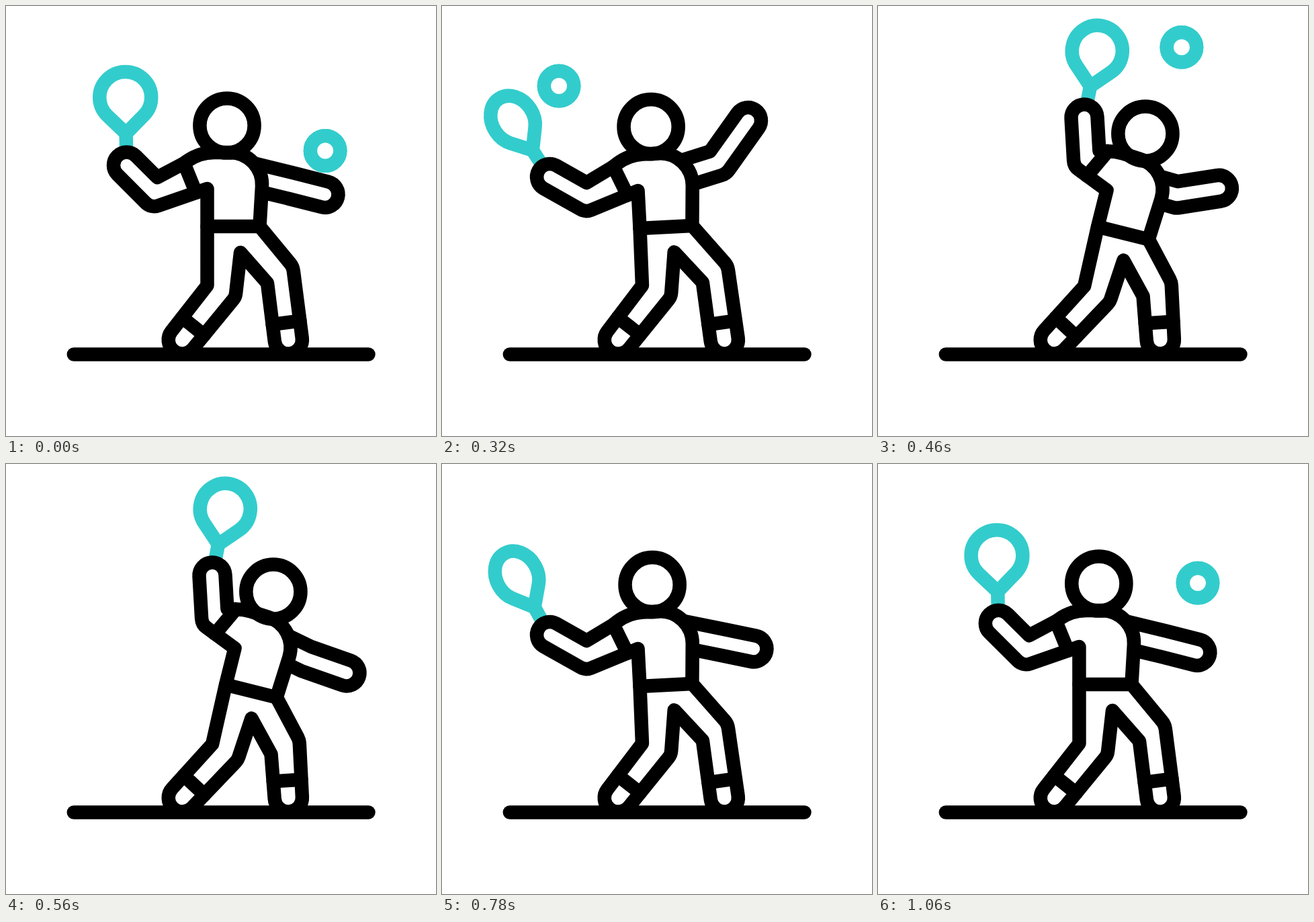
An HTML page with a canvas for the animation above (1080 ms loop, 640 by 640 pixels).

```html
<!DOCTYPE html>
<html lang="en">
<head>
<meta charset="utf-8">
<title>Racket player</title>
<style>
  html, body { margin: 0; width: 100%; height: 100%; overflow: hidden; background: #fff; }
  canvas { display: block; width: 100vw; height: 100vh; }
</style>
</head>
<body>
<canvas id="stage" width="640" height="640"></canvas>
<script>
const ctx = document.getElementById('stage').getContext('2d');
const LOOP = 1080;
const INK = '#000', TEAL = '#33cccc';
const WAIST = [299.5, 328], HIP = [377.5, 328];
const FEET = [[262.3, 497], [420.3, 497]];
const ARM = 19.5, FOOT = 20.6;

// Body poses: waist position, torso and racket angles in degrees,
// raised shoulder offset, racket hand and elbow, sleeve end along the arm.
const ready = {
  x: 299.5, y: 328, lean: 0, nod: 0, liftX: 0, liftY: 0,
  handX: 179.5, handY: 237, elbowX: 220.5, elbowY: 278,
  swing: -1, face: 38.5, cuff: 0.8
};
const windup = {
  x: 294.5, y: 331, lean: -3, nod: -5, liftX: 0, liftY: 0,
  handX: 160.5, handY: 254.5, elbowX: 214.5, elbowY: 285,
  swing: -33, face: 31, cuff: 0.8
};
const strike = {
  x: 327, y: 328.5, lean: 14, nod: 6, liftX: 26, liftY: -13,
  handX: 307, handY: 166, elbowX: 310.5, elbowY: 227,
  swing: 11, face: 37.5, cuff: 0.4
};
const recover = { ...windup, nod: -3, swing: -29 };
const bodyKeys = [
  [0, ready], [320, windup], [450, strike], [560, strike], [780, recover], [LOOP, ready]
];

const reach = (elbowX, elbowY, handX, handY) => ({ elbowX, elbowY, handX, handY });
const rest = reach(424, 267.5, 475, 280.5);
const armKeys = [
  [0, rest],
  [160, reach(410.5, 250, 474, 227)],
  [320, reach(411, 233, 455.5, 170.5)],
  [400, reach(442, 270, 507.5, 231.5)],
  [560, reach(447, 290, 507, 311)],
  [780, reach(418, 265.5, 464, 275)],
  [LOOP, rest]
];

// Smooth curve through the keys, resting at turning points.
function pose(keys, t) {
  let i = 0;
  while (t >= keys[i + 1][0]) i++;
  const [t0, a] = keys[i], [t1, b] = keys[i + 1];
  const d = t1 - t0, u = (t - t0) / d, result = {};
  const rate = (j, name) =>
    (keys[j + 1][1][name] - keys[j][1][name]) / (keys[j + 1][0] - keys[j][0]);
  const slope = (j, name) => {
    if (j === 0 || j === keys.length - 1) return 0;
    const l = rate(j - 1, name), r = rate(j, name);
    return l * r > 0 ? 2 * l * r / (l + r) : 0;
  };
  for (const name in a) {
    result[name] = a[name] + (b[name] - a[name]) * u * u * (3 - 2 * u) +
      d * u * (1 - u) * (slope(i, name) * (1 - u) - slope(i + 1, name) * u);
  }
  return result;
}

function ballAt(t) {
  if (t < 320) {
    const u = t / 160;
    return [476 - 135 * u - 8 * u * u, 217 - 251 * u + 101 * u * u];
  }
  if (t < 560) {
    const p = Math.pow((t - 320) / 200, 1.68);
    return [174 + 500 * p, 119 - 137 * p + 60 * p * p];
  }
  return [476, 217 - 2.1 * (LOOP - t)];
}

const add = (p, q, k = 1) => [p[0] + q[0] * k, p[1] + q[1] * k];
const sub = (p, q) => add(p, q, -1);
const mix = (p, q, k = 0.5) => add(p, sub(q, p), k);
const unit = p => add([0, 0], p, 1 / Math.hypot(...p));
const normal = (p, q) => {
  const [x, y] = unit(sub(q, p));
  return [y, -x];
};

const to = (...points) => points.forEach(p => ctx.lineTo(...p));
const round = (corner, next, r) => ctx.arcTo(...corner, ...next, r);

function line(p, q) {
  ctx.beginPath();
  to(p, q);
  ctx.stroke();
}

function ring(p, r) {
  ctx.beginPath();
  ctx.arc(...p, r, 0, 7);
  ctx.stroke();
}

// Half circle around the end of a limb.
function cap(tip, joint, r) {
  const a = Math.atan2(joint[1] - tip[1], joint[0] - tip[0]);
  ctx.arc(...tip, r, a - Math.PI / 2, a + Math.PI / 2, true);
}

// Offset from a bent joint to the corner of its outline.
function corner(tip, joint, root) {
  const m = normal(tip, joint), n = normal(joint, root);
  return add([0, 0], add(m, n), ARM / (1 + m[0] * n[0] + m[1] * n[1]));
}

// Where the body points lie once the torso leans and the legs follow the hip.
function skeleton(p) {
  const a = p.lean * Math.PI / 180, c = Math.cos(a), s = Math.sin(a);
  const place = (x, y) => {
    const [dx, dy] = sub([x, y], WAIST);
    return [p.x + dx * c - dy * s, p.y + dx * s + dy * c];
  };
  const lift = [p.liftX, p.liftY];
  const hip = place(...HIP), shift = sub(hip, HIP);
  const follow = (x, y, kx, ky) => [x + shift[0] * kx, y + shift[1] * ky];
  return {
    hip,
    waist: [p.x, p.y],
    head: add(place(329, 178), [p.nod, 0]),
    chest: place(360, 252),
    side: place(384, 218),
    collar: add(place(288, 218), lift, 0.3),
    shoulder: add(place(265, 234), lift),
    armpit: place(299.5, 272),
    hand: [p.handX, p.handY],
    elbow: [p.elbowX, p.elbowY],
    crotch: follow(349, 367, 0.65, 0.6),
    leftLeg: [follow(299.5, 416, 0.3, 0.05), follow(341.5, 433, 0.14, 0.37)],
    rightLeg: [follow(389, 412.5, 0.22, 1), follow(427, 388, 0.38, 1.2)]
  };
}

function drawRacket(p) {
  const tall = 38, middle = -101, neck = middle + tall * Math.SQRT2;
  ctx.save();
  ctx.translate(p.handX, p.handY);
  ctx.rotate(p.swing * Math.PI / 180);
  ctx.lineCap = 'butt';
  ctx.beginPath();
  ctx.ellipse(0, middle, p.face, tall, 0, Math.PI * 0.75, Math.PI * 2.25);
  ctx.lineTo(0, neck);
  ctx.closePath();
  ctx.stroke();
  line([0, neck], [0, -22]);
  ctx.restore();
}

function drawFreeArm(p, chest) {
  const elbow = [p.elbowX, p.elbowY], hand = [p.handX, p.handY];
  const bend = corner(hand, elbow, chest), n = normal(elbow, chest);
  ctx.beginPath();
  to(add(chest, n, ARM));
  round(add(elbow, bend), add(hand, normal(hand, elbow), ARM), 20);
  cap(hand, elbow, ARM);
  to(sub(elbow, bend), add(chest, n, -ARM));
  ctx.stroke();
}

function drawAnkle(foot, [left, right]) {
  const n = normal(foot, mix(left, right));
  const ends = [[left, FOOT], [right, -FOOT]].map(([knee, r]) => {
    const start = add(foot, n, r);
    return add(start, unit(sub(knee, start)), 26);
  });
  line(...ends);
}

function drawBody(b, cuff) {
  const [leftOut, leftIn] = b.leftLeg, [rightIn, rightOut] = b.rightLeg;
  const bend = corner(b.hand, b.elbow, mix(b.shoulder, b.armpit));
  const tipOfElbow = sub(b.elbow, bend);
  ctx.beginPath();
  to(b.hip);
  round(b.side, b.collar, 48);
  round(b.collar, b.shoulder, 70);
  to(b.shoulder, add(b.elbow, bend));
  cap(b.hand, b.elbow, ARM);
  round(tipOfElbow, b.armpit, 18);
  to(b.armpit, b.waist, leftOut);
  cap(FEET[0], mix(leftOut, leftIn), FOOT);
  round(leftIn, b.crotch, 18);
  to(b.crotch, rightIn);
  cap(FEET[1], mix(rightIn, rightOut), FOOT);
  round(rightOut, b.hip, 22);
  ctx.closePath();
  ctx.fill();
  ctx.stroke();

  line(b.shoulder, mix(tipOfElbow, b.armpit, cuff));
  line(b.waist, b.hip);
  drawAnkle(FEET[0], b.leftLeg);
  drawAnkle(FEET[1], b.rightLeg);
  ring(b.head, 40.6);
}

function draw() {
  const t = performance.now() % LOOP;
  const body = pose(bodyKeys, t), bones = skeleton(body);
  ctx.fillStyle = '#fff';
  ctx.fillRect(0, 0, 640, 640);
  ctx.lineWidth = 20.5;
  ctx.lineCap = ctx.lineJoin = 'round';

  ctx.strokeStyle = TEAL;
  drawRacket(body);
  ring(ballAt(t), 22.2);
  ctx.fill();
  ctx.stroke();

  ctx.strokeStyle = INK;
  line([100.8, 518.5], [539.5, 518.5]);
  drawFreeArm(pose(armKeys, t), bones.chest);
  drawBody(bones, body.cuff);
  requestAnimationFrame(draw);
}
draw();
</script>
</body>
</html>
```
